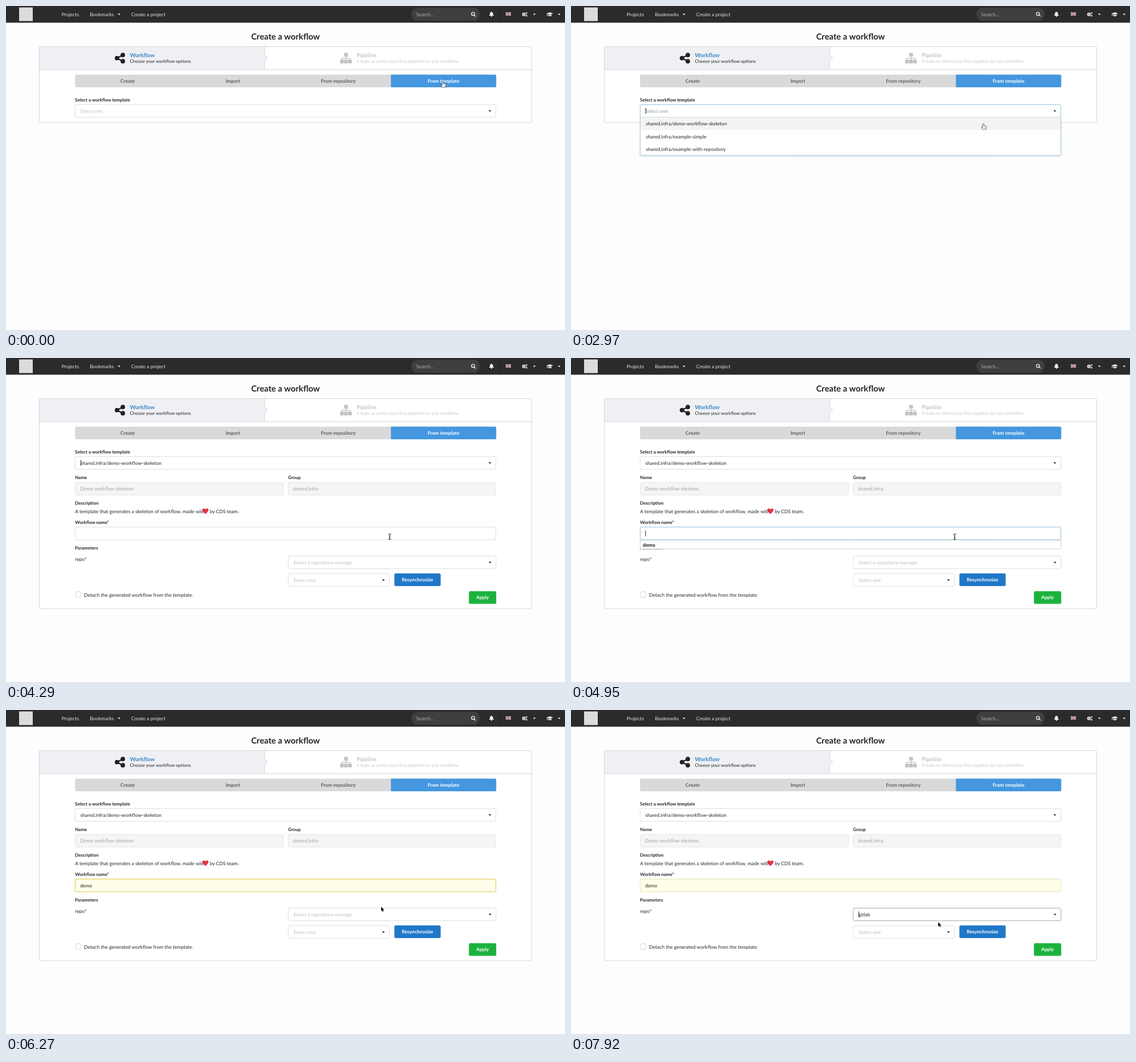
Write an HTML page with a canvas that moves like this. It is 982 px wide and 570 px high and loops after 8 s.

```html
<!DOCTYPE html>
<html lang="en">
<head>
<meta charset="utf-8">
<title>Create a workflow</title>
<style>
  html, body { margin: 0; width: 100%; height: 100%; overflow: hidden; background: #fdfdfd; }
  canvas { display: block; width: 982px; height: 570px; }
</style>
</head>
<body>
<canvas id="stage" width="982" height="570"></canvas>
<script>
const ctx = document.getElementById('stage').getContext('2d');
const LOOP = 8000, STEP = 330;
const BODY = 8.59, SMALL = 7.98, TITLE = 9.82, HEADING = 14.75;
const INK = '#262626', FAINT = '#bfbfbf', LINE = '#dedede', FOCUS = '#96c8da', HOVER = '#a9a9a9';

// Pointer positions, each held from its step until the next entry.
const pointer = [
  [0, 'hand', 768, 134], [4, 'arrow', 748, 170], [5, 'beam', 738, 184.5],
  [7, 'beam', 731, 194.5], [9, 'hand', 725, 208], [10, 'arrow', 723, 208],
  [12, 'arrow', 701, 261], [13, 'beam', 674, 314.5], [16, 'arrow', 667, 328],
  [19, 'arrow', 659, 346], [20, 'beam', 654.5, 358.5], [22, 'hand', 648, 377],
  [24, 'arrow', 645, 373]
];

function text(str, x, y, { size = BODY, color = INK, bold = false, align = 'left' } = {}) {
  ctx.font = `${bold ? 'bold ' : ''}${size}px Lato, sans-serif`;
  ctx.textRendering = 'geometricPrecision'; // fractional glyph advances
  ctx.fillStyle = color;
  ctx.textAlign = align;
  ctx.fillText(str, x, y + size * 0.36);
}

function rect(x, y, w, h, color) {
  ctx.fillStyle = color;
  ctx.fillRect(x, y, w, h);
}

function box(x, y, w, h, { fill = '#fff', stroke, r = 2.5 } = {}) {
  ctx.beginPath();
  ctx.roundRect(x, y, w, h, r);
  ctx.fillStyle = fill;
  ctx.fill();
  if (stroke) {
    ctx.strokeStyle = stroke;
    ctx.lineWidth = 1;
    ctx.stroke();
  }
}

function disc(x, y, r, color) {
  ctx.fillStyle = color;
  ctx.beginPath();
  ctx.arc(x, y, r, 0, 7);
  ctx.fill();
}

function path(points, { fill, stroke, width = 1, close = true }) {
  ctx.beginPath();
  points.forEach(([x, y]) => ctx.lineTo(x, y));
  if (close) ctx.closePath();
  if (stroke) {
    ctx.strokeStyle = stroke;
    ctx.lineWidth = width;
    ctx.stroke();
  }
  if (fill) {
    ctx.fillStyle = fill;
    ctx.fill();
  }
}

const line = (points, stroke, width = 1) => path(points, { stroke, width, close: false });
const triangle = (x, y, color) =>
  path([[x - 2.5, y - 1.2], [x + 2.5, y - 1.2], [x, y + 1.5]], { fill: color });
const caret = (x, y) => rect(x, y - 5, 1, 10, '#222');

function gear(x, y, r) {
  ctx.strokeStyle = '#eee';
  ctx.lineWidth = r * 0.7;
  ctx.beginPath();
  ctx.arc(x, y, r * 0.7, 0, 7);
  ctx.stroke();
  for (let i = 0; i < 8; i++) {
    const a = i * Math.PI / 4;
    line([[x + r * 0.8 * Math.cos(a), y + r * 0.8 * Math.sin(a)],
          [x + r * 1.3 * Math.cos(a), y + r * 1.3 * Math.sin(a)]], '#eee', r * 0.45);
  }
}

function flag(x, y) {
  rect(x, y, 9, 6, '#35477f');
  line([[x, y], [x + 9, y + 6]], '#e6dfe4', 1.2);
  line([[x + 9, y], [x, y + 6]], '#e6dfe4', 1.2);
  rect(x + 3.2, y, 2.6, 6, '#f0e8ea');
  rect(x, y + 1.8, 9, 2.4, '#f0e8ea');
  rect(x + 3.8, y, 1.4, 6, '#d0475a');
  rect(x, y + 2.4, 9, 1.2, '#d0475a');
}

function navbar() {
  const light = '#e6e6e6';
  rect(0, 0, 982, 29.4, '#2b2b2b');
  rect(23, 2.5, 24, 24, '#dcdcdc');
  text('Projects', 97.8, 14.5, { color: light });
  text('Bookmarks', 147.5, 14.5, { color: light });
  triangle(198.7, 14.7, light);
  text('Create a project', 220, 14.5, { color: light });

  box(712, 3, 120, 23, { fill: '#3f3f3f', r: 11.5 });
  text('Search...', 720.5, 15, { color: '#b0b0b0' });
  ctx.strokeStyle = '#eee';
  ctx.lineWidth = 1.4;
  ctx.beginPath();
  ctx.arc(820.3, 13.8, 2.7, 0, 7);
  ctx.stroke();
  line([[822.3, 15.8], [825, 18.5]], '#eee', 1.6);

  ctx.fillStyle = '#f0f0f0';
  ctx.beginPath();
  ctx.moveTo(848.5, 17);
  ctx.quadraticCurveTo(850.3, 15.5, 850.3, 13);
  ctx.bezierCurveTo(850.3, 9.3, 855.3, 9.3, 855.3, 13);
  ctx.quadraticCurveTo(855.3, 15.5, 857.2, 17);
  ctx.fill();
  disc(852.9, 17.7, 1.2, '#f0f0f0');

  flag(878, 11);
  gear(909.7, 14.7, 2.5);
  gear(914.3, 12.5, 1.4);
  gear(914.3, 17, 1.4);
  triangle(928.3, 14.7, light);
  [867.5, 897.5, 940.5].forEach(x => rect(x, 0, 1, 29, '#252525'));
  path([[949.5, 13.2], [955.5, 11], [961, 13.2], [955.5, 15.4]], { fill: '#eee' });
  path([[952.3, 15], [955.5, 16.2], [958.5, 15], [958.5, 17.2], [955.5, 18.3], [952.3, 17.2]], { fill: '#eee' });
  line([[950.7, 13.5], [950.5, 18]], '#eee', 0.8);
  triangle(971.8, 14.7, light);
}

function shareIcon() {
  const nodes = [[205.2, 86.2], [195, 91.7], [205.2, 97.2]];
  line(nodes, '#222', 2.4);
  nodes.forEach(([x, y]) => disc(x, y, 3.9, '#222'));
}

function treeIcon() {
  const grey = '#c2c2c2';
  box(594, 82.5, 6.7, 6.5, { fill: grey, r: 1 });
  [587, 594, 601].forEach(x => box(x, 94.5, 6.5, 6.5, { fill: grey, r: 1 }));
  line([[590.2, 95], [590.2, 91.8], [604.3, 91.8], [604.3, 95]], grey, 1.3);
  line([[597.3, 89], [597.3, 95]], grey, 1.3);
}

function panel(bottom) {
  const edge = '#d6d6d7';
  text('Create a workflow', 491, 53.7, { size: HEADING, bold: true, align: 'center', color: '#222' });
  box(58.5, 71.5, 865, bottom - 71.5, { stroke: edge, r: 1 });
  rect(59, 72, 395, 40, '#eef0f4');
  line([[59, 112], [923, 112]], edge);
  path([[454, 86], [460, 91.7], [454, 97.4]], { fill: '#eef0f4' });
  line([[454.3, 72], [454.3, 86], [460, 91.7], [454.3, 97.4], [454.3, 112]], edge);

  shareIcon();
  text('Workflow', 217.5, 86, { size: TITLE, bold: true, color: '#3f86c4' });
  text('Choose your workflow options', 217.5, 97.6, { size: SMALL });
  treeIcon();
  text('Pipeline', 616, 86, { size: TITLE, bold: true, color: '#c4c4c4' });
  text('Create or select your first pipeline for you workflow', 616, 97.6, { size: SMALL, color: '#c8c8c8' });

  box(121.2, 120.8, 740, 22.1, { fill: '#d9d9d9' });
  box(676.2, 120.8, 185, 22.1, { fill: '#4497df', r: [0, 2.5, 2.5, 0] });
  ['Create', 'Import', 'From repository', 'From template'].forEach((name, i) =>
    text(name, 213.7 + i * 185, 131.6, { bold: true, align: 'center', color: i === 3 ? '#fff' : '#5c5c5c' }));
}

const label = (str, x, y) => text(str, x, y, { size: SMALL, bold: true });

function select(x, y, w, value, { color = FAINT, stroke = LINE, r = 2.5 } = {}) {
  box(x, y, w, 22.2, { stroke, r });
  text(value, x + 9, y + 11.2, { color });
  triangle(x + w - 10.5, y + 11.2, '#222');
}

function options(x, y, w, names) {
  const h = names.length * 22.3;
  ctx.save();
  ctx.shadowColor = 'rgba(34,36,38,.15)';
  ctx.shadowBlur = 3;
  ctx.shadowOffsetY = 1.5;
  box(x, y, w, h, { r: [0, 0, 2.5, 2.5] });
  ctx.restore();
  box(x, y, w, h, { stroke: FOCUS, r: [0, 0, 2.5, 2.5] });
  rect(x + 0.5, y - 0.5, w - 1, 22.4, '#f3f3f3');
  names.forEach((name, i) => text(name, x + 10, y + 11.4 + i * 22.3));
}

function templateSelect(step) {
  const open = step >= 6 && step < 10, chosen = step >= 10;
  const stroke = open ? FOCUS : step === 5 || step === 10 ? HOVER : LINE;
  label('Select a workflow template', 121.3, 165.2);
  select(121.5, 173.5, 739, chosen ? 'shared.infra/demo-workflow-skeleton' : 'Select one', {
    color: chosen ? INK : open ? '#959595' : FAINT, stroke, r: open ? [2.5, 2.5, 0, 0] : 2.5
  });
  if ([6, 9, 10, 11, 13].includes(step)) caret(131, 184.5);
  if (open) options(121.5, 196, 739, ['demo-workflow-skeleton', 'example-simple', 'example-with-repository']
    .map(name => 'shared.infra/' + name));
}

function heart(x, y) {
  ctx.fillStyle = '#e2343f';
  ctx.beginPath();
  ctx.moveTo(x, y + 5);
  ctx.bezierCurveTo(x - 9, y - 1, x - 5, y - 7.5, x, y - 3);
  ctx.bezierCurveTo(x + 5, y - 7.5, x + 9, y - 1, x, y + 5);
  ctx.fill();
}

function button(str, x, y, w, fill) {
  box(x, y, w, 22.1, { fill });
  text(str, x + w / 2, y + 11, { bold: true, color: '#fff', align: 'center' });
}

function nameField(step) {
  const filled = step >= 16, focused = step >= 14 && step < 21;
  const stroke = filled ? (focused ? '#d5c94a' : '#e8e3b4') : focused ? '#8fbfdc' : LINE;
  label('Workflow name*', 121.3, 289);
  box(121.5, 297.4, 739, 22.4, { fill: filled ? '#fffee8' : '#fff', stroke });
  if (filled) text('demo', 130.2, 309);
  if (step >= 14 && step <= 16) caret(130.5, 308.7);
  if ([17, 18, 20].includes(step)) caret(151.5, 308.7);
}

function suggestion(step) {
  if (step < 14 || step > 16) return;
  const active = step === 16;
  box(121.5, 320.5, 739.5, 15.5, { fill: active ? '#a5cefb' : '#fff', stroke: active ? '#a0c8f2' : '#d2d2d2', r: 0 });
  text('demo', 126.3, 329, { bold: true, color: '#111' });
}

function form(step) {
  const disabled = { fill: '#f5f5f5', stroke: '#e4e4e4' };
  label('Name', 121.3, 210.3);
  label('Group', 495.5, 210.3);
  box(121.5, 219, 366, 22, disabled);
  box(495.5, 219, 365, 22, disabled);
  text('Demo workflow skeleton', 130.2, 230.2, { color: '#a0a0a0' });
  text('shared.infra', 504.3, 230.2, { color: '#a0a0a0' });

  label('Description', 121.3, 255.2);
  text('A template that generates a skeleton of workflow, made with', 121.3, 269.5);
  heart(350.3, 269.2);
  text('by CDS team.', 358, 269.5);

  nameField(step);
  label('Parameters', 121.3, 334);
  text('repo*', 121.3, 354.3);

  select(495.9, 379.5, 177.6, 'Select one');
  button('Resynchronize', 682.3, 379.1, 81.3, '#1f78c8');
  const open = step >= 21 && step < 24, chosen = step >= 24;
  select(495.9, 348.5, 364.9, chosen ? 'gitlab' : 'Select a repository manager', {
    color: chosen ? INK : open ? '#959595' : FAINT,
    stroke: open ? FOCUS : step === 20 || chosen ? HOVER : LINE,
    r: open ? [2.5, 2.5, 0, 0] : 2.5
  });
  if ([21, 23, 24].includes(step)) caret(505, 359.5);
  if (open) options(495.9, 370.7, 364.9, ['gitlab']);

  box(122, 411.3, 9.7, 9.7, { stroke: '#d2d2d2', r: 1.5 });
  text('Detach the generated workflow from the template.', 137, 416.8);
  button('Apply', 813.2, 410.3, 48, '#1cb23e');
  suggestion(step);
}

const cursors = {
  arrow() {
    path([[0, 0], [0, 8], [1.8, 6.4], [3, 9], [4.3, 8.4], [3.2, 5.9], [5.5, 5.7]],
      { fill: '#111', stroke: '#fff', width: 1.2 });
  },
  beam() {
    const serifs = y => line([[-2.5, y], [-0.8, y], [0, y * 0.85], [0.8, y], [2.5, y]], '#222', 1);
    line([[0, -4.5], [0, 4.5]], '#222', 1.2);
    serifs(-4.7);
    serifs(4.7);
    line([[-1.3, 1], [1.3, 1]], '#222', 0.8);
  },
  hand() {
    path([[-1.5, 0.3], [-0.7, -0.4], [0.2, 0.3], [0.3, 3], [3.7, 3.6], [4.6, 4.6], [4.2, 7.3],
          [3.2, 9.4], [-0.7, 9.4], [-3.6, 6], [-3.2, 5], [-1.5, 6]],
      { fill: '#fff', stroke: '#222', width: 1.4 });
    [0.7, 2.2].forEach(x => line([[x, 5.5], [x, 8]], '#555', 0.5));
  }
};

function drawPointer(step) {
  const [, kind, x, y] = pointer.findLast(([from]) => from <= step);
  ctx.save();
  ctx.translate(x, y);
  ctx.lineJoin = 'round';
  cursors[kind]();
  ctx.restore();
}

function draw() {
  const step = Math.floor((performance.now() % LOOP) / STEP);
  const expanded = step >= 10;
  rect(0, 0, 982, 570, '#fdfdfd');
  navbar();
  panel(expanded ? 441 : 205);
  templateSelect(step);
  if (expanded) form(step);
  drawPointer(step);
  requestAnimationFrame(draw);
}

draw();
</script>
</body>
</html>
```
